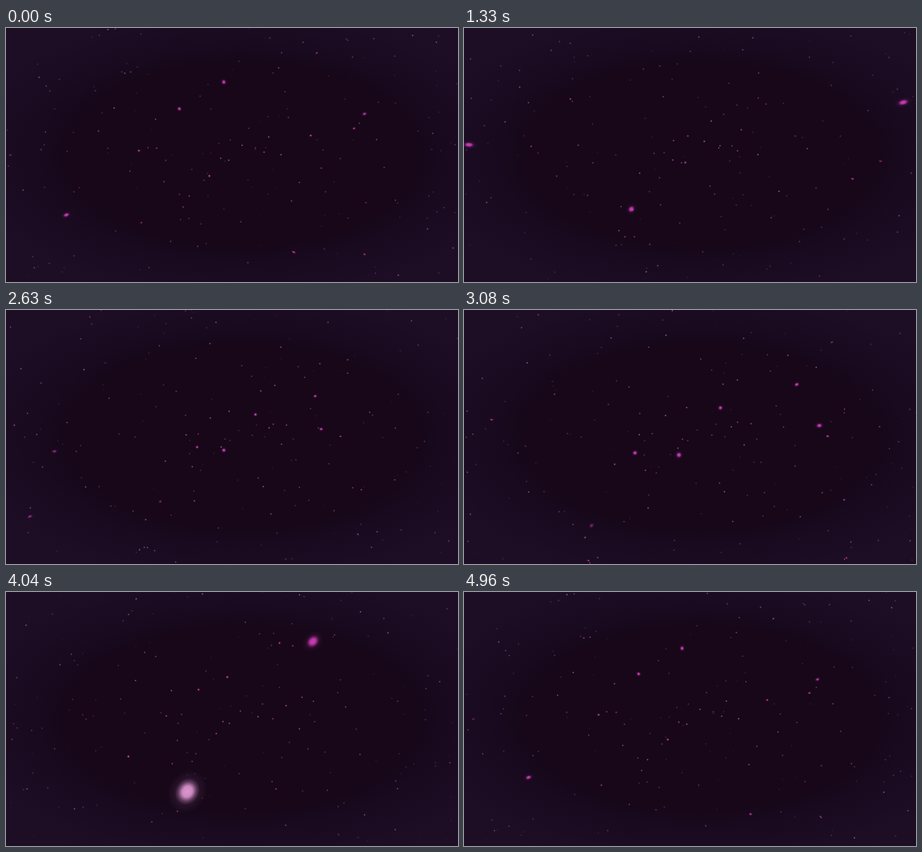
These frames come from a looping animation (660x371 px, 5000 ms). An HTML page with a canvas:

```html
<!DOCTYPE html>
<html lang="en">
<head>
<meta charset="utf-8">
<title>Starfield</title>
<style>
  html, body { margin: 0; width: 100%; height: 100%; overflow: hidden; background: #190a1e; }
  canvas { display: block; width: 100vw; height: 100vh; }
</style>
</head>
<body>
<canvas id="stage" width="660" height="371"></canvas>
<script>
const W = 660, H = 371, CX = W / 2, CY = H / 2;
const LOOP = 5, FPS = 24, FAR = 8, FOCAL = 200;
const MAGENTA = [205, 58, 182], DUSTY = [175, 92, 150], PALE = [222, 150, 210];
const ctx = document.getElementById('stage').getContext('2d');

function seeded(seed) {
  return () => (seed = (seed * 16807) % 2147483647) / 2147483647;
}
const random = seeded(4177);
const between = (low, high) => low + (high - low) * random();

// x, y: offset from the centre at depth 1; arrival: seconds until it passes the viewer.
const star = (x, y, arrival, size = 2.8, light = 1) => ({ x, y, arrival, size, light });

// The few stars that come close enough to be seen as discs.
const stars = [
  star(-20.6, 33.4, 4.357, 4.4),
  star(68.3, -65.5, 4.62, 4),
  star(-64, 18.5, 3.88, 2.2),
  star(192, -17, 4.1),
  star(252, -124, 4.7, 3.6),
  star(343, -2, 4.79, 2.4),
  star(243, -60, 2.114),
  star(-313, -14.5, 2.303, 3.2),
  star(-72, 66.5, 2.174, 3.2),
  star(-15.5, -138, 1.295, 3.4),
  star(-128, -112.4, 1.665, 3.8),
  star(-387, 140, 1.6, 4)
];

// Dust fills the whole view cone evenly, apart from the path of the viewer.
for (let i = 0; i < 360; i++) {
  const x = between(-1, 1) * CX * FAR, y = between(-1, 1) * CY * FAR;
  if (Math.hypot(x, y) < 200) continue;
  stars.push(star(x, y, random() * LOOP, between(1.8, 3.2), between(0.45, 1)));
}

function mix(from, to, k) {
  k = Math.max(0, Math.min(1, k));
  return from.map((v, i) => Math.round(v + (to[i] - v) * k));
}

function drawBackground() {
  ctx.save();
  ctx.translate(345, 185);
  ctx.scale(1, 0.52);
  const shade = ctx.createRadialGradient(0, 0, 0, 0, 0, 430);
  shade.addColorStop(0.6, '#170719');
  shade.addColorStop(0.72, '#1a0a20');
  shade.addColorStop(1, '#1d0e26');
  ctx.fillStyle = shade;
  ctx.fillRect(-345, -360, W, 720);
  ctx.restore();
}

function drawStar({ x, y, size, light }, z) {
  const dx = x / z, dy = y / z, radius = Math.max(1.05, size / z);
  const reach = radius * 2;
  if (Math.abs(dx) > CX + reach || Math.abs(dy) > CY + reach) return;

  const rgb = radius > 5 ? mix(MAGENTA, PALE, (radius - 7) / 5) : mix(MAGENTA, DUSTY, (z - 1.5) / 3);
  const alpha = light * Math.min(1, (FAR - z) / 3);
  // Wide-angle perspective stretches near stars away from the centre.
  const stretch = z < 2.5 ? Math.hypot(1, Math.hypot(dx, dy) / FOCAL) : 1;
  const glow = ctx.createRadialGradient(0, 0, 0, 0, 0, reach);
  const stop = (at, strength) => glow.addColorStop(at, `rgba(${rgb},${alpha * strength})`);
  stop(0, 1);
  stop(0.25, 0.9);
  stop(0.45, 0.35);
  stop(0.62, 0.08);
  stop(1, 0);

  ctx.save();
  ctx.translate(CX + dx, CY + dy);
  ctx.rotate(Math.atan2(dy, dx));
  ctx.scale(stretch, 1);
  ctx.fillStyle = glow;
  ctx.fillRect(-reach, -reach, 2 * reach, 2 * reach);
  ctx.restore();
}

function draw(t) {
  drawBackground();
  for (const s of stars) {
    // Each star is followed by a copy one loop behind it, so the cycle is seamless.
    for (let z = s.arrival - t; z < FAR; z += LOOP) {
      if (z > 0.06) drawStar(s, z);
    }
  }
}

const start = performance.now();
function tick() {
  const t = ((performance.now() - start) / 1000) % LOOP;
  draw(Math.floor((t + 0.005) * FPS) / FPS);
  requestAnimationFrame(tick);
}
tick();
</script>
</body>
</html>
```
